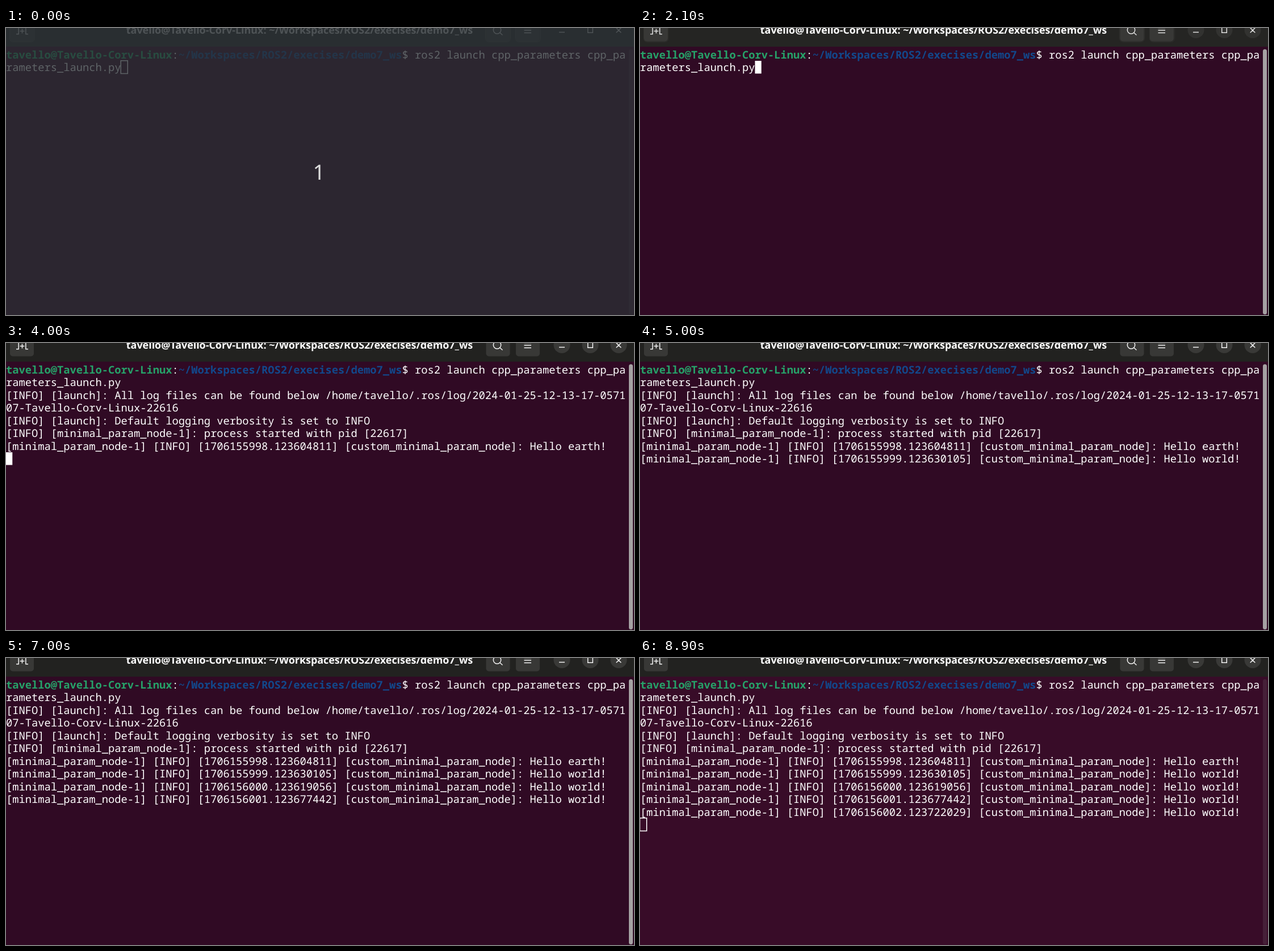
An HTML page that plays this animation: 1106 by 507 pixels, repeating every 9 s.

```html
<!DOCTYPE html>
<html lang="en">
<head>
<meta charset="utf-8">
<title>Terminal launch</title>
<style>
  html, body { margin: 0; width: 100%; height: 100%; overflow: hidden; background: #300a24; }
  svg { display: block; width: 100%; height: 100%; }
  text { white-space: pre; text-rendering: geometricPrecision; }
  #terminal { font: 500 18.75px "Noto Sans Mono", "DejaVu Sans Mono", monospace; fill: #fff; }
  .user { font-weight: 700; fill: #26a269; }
  .path { font-weight: 700; fill: #12488b; }
  #title { font: 700 17.9px "Noto Sans", "Open Sans", sans-serif; fill: #fff; text-anchor: middle; }
  #count { font: 500 37px "Noto Sans", "Open Sans", sans-serif; fill: #dcdcdc; text-anchor: middle; }
  #icons { fill: none; stroke: #f4f4f4; stroke-width: 1.5; }
</style>
</head>
<body>
<svg viewBox="0 0 1106 507">
  <rect id="screen" width="1106" height="507"/>
  <rect id="scrollbar" x="1097" y="37.5" width="7" height="468.5" rx="3.5"/>

  <rect width="1106" height="33" fill="#2c2c2a"/>
  <rect id="activeBar" width="1106" height="33" fill="#222220"/>
  <g fill="#383836">
    <rect x="7" y="-18" width="42" height="41.5" rx="5"/>
    <rect x="845.5" y="-18" width="42" height="41.5" rx="5"/>
    <rect x="898" y="-18" width="42" height="41.5" rx="5"/>
  </g>
  <g id="outlines" fill="none" stroke="#454543">
    <rect x="6.5" y="-18" width="43.5" height="42.5" rx="6"/>
    <rect x="844.5" y="-18" width="44" height="42.5" rx="6"/>
    <rect x="897.5" y="-18" width="44" height="42.5" rx="6"/>
  </g>
  <g id="circles" fill="#393937">
    <circle cx="979" cy="3.5" r="14.5"/>
    <circle cx="1029" cy="3.5" r="14.5"/>
    <circle cx="1079" cy="3.5" r="14.5"/>
  </g>
  <g id="icons">
    <path d="M18 10.8H22.2V-2M39 10.8H34.8V-2M24.5 5.5H32.5M28.5 1.5V9.5"/>
    <circle cx="865" cy="3.5" r="6.7"/>
    <path d="M869.8 8.2L874.5 12.5M912.5-.5H925M912.5 4H925M912.5 8.5H925"/>
    <path d="M974 7.5H984M1024.7-2V8.2H1033.3V-2M1074.7-.3L1083.3 8.3M1083.3-.3L1074.7 8.3"/>
  </g>
  <text id="title" x="517" y="10">tavello@Tavello-Corv-Linux: ~/Workspaces/ROS2/execises/demo7_ws</text>

  <g id="terminal"></g>
  <rect id="cursor" stroke="#fff" stroke-width="1.5"/>

  <g id="countdown">
    <rect width="1106" height="507" fill="#282f33" opacity=".75"/>
    <text id="count" x="551" y="268">1</text>
  </g>
</svg>
<script>
const LOOP = 9000, CELL = 11.25, ROW = 22.5, TOP = 35, BASELINE = 18.7;
const $ = id => document.getElementById(id);
const set = (id, attrs) => {
  for (const name in attrs) $(id).setAttribute(name, attrs[name]);
};

const greeting = (stamp, word) =>
  `[minimal_param_node-1] [INFO] [${stamp}] [custom_minimal_param_node]: Hello ${word}!`;

const lines = [
  '<tspan class="user">tavello@Tavello-Corv-Linux</tspan>:' +
  '<tspan class="path">~/Workspaces/ROS2/execises/demo7_ws</tspan>$ ros2 launch cpp_parameters cpp_pa',
  'rameters_launch.py',
  '[INFO] [launch]: All log files can be found below /home/tavello/.ros/log/2024-01-25-12-13-17-0571',
  '07-Tavello-Corv-Linux-22616',
  '[INFO] [launch]: Default logging verbosity is set to INFO',
  '[INFO] [minimal_param_node-1]: process started with pid [22617]',
  greeting('1706155998.123604811', 'earth'),
  greeting('1706155999.123630105', 'world'),
  greeting('1706156000.123619056', 'world'),
  greeting('1706156001.123677442', 'world'),
  greeting('1706156002.123722029', 'world')
];
$('terminal').innerHTML = lines.map((line, row) =>
  `<text x="0" y="${TOP + BASELINE + row * ROW}">${line}</text>`).join('');
const rows = [...$('terminal').children];

// Each entry holds [start time, value] until the next one.
const lineCount = [[0, 2], [2900, 5], [3000, 6], [4000, 7], [5000, 8], [6000, 9], [7000, 10], [8000, 11]];
const cursorOn = [[0, 1], [2600, 0], [2800, 1], [3500, 0], [4000, 1], [4600, 0], [5200, 1],
                  [5800, 0], [6500, 1], [7000, 0], [7600, 1], [8200, 0], [8800, 1]];
const headerFocus = [[0, 0], [2100, .65], [2200, .88], [2300, 1]];
const valueAt = (track, t) => track.filter(([start]) => start <= t).pop()[1];

function draw(t) {
  const focused = t >= 2100 && t < 8900;
  const header = valueAt(headerFocus, t);
  set('screen', { fill: focused ? '#300a24' : '#380c28' });
  set('scrollbar', { fill: focused ? '#a5a1a3' : '#452038' });
  set('activeBar', { opacity: header });
  set('circles', { opacity: header });
  set('outlines', { opacity: 1 - header });
  set('icons', { opacity: .72 + .28 * header });
  set('title', { opacity: header ? 1 : .7 });

  const count = valueAt(lineCount, t);
  rows.forEach((row, i) => row.setAttribute('visibility', i < count ? 'visible' : 'hidden'));

  const typing = t < 2800;
  set('cursor', {
    x: (typing ? 18 * CELL : 0) - (focused ? 0 : .3),
    y: TOP + (typing ? 1 : count) * ROW + (focused ? .5 : .2),
    width: focused ? CELL : CELL + .8,
    height: focused ? ROW : ROW + .3,
    fill: focused ? '#fff' : 'none',
    'stroke-opacity': focused ? 0 : 1,
    visibility: valueAt(cursorOn, t) ? 'visible' : 'hidden'
  });
  set('countdown', { visibility: t < 100 ? 'visible' : 'hidden' });
}

const begin = performance.now();
function tick() {
  draw((performance.now() - begin) % LOOP);
  requestAnimationFrame(tick);
}
tick();
</script>
</body>
</html>
```
